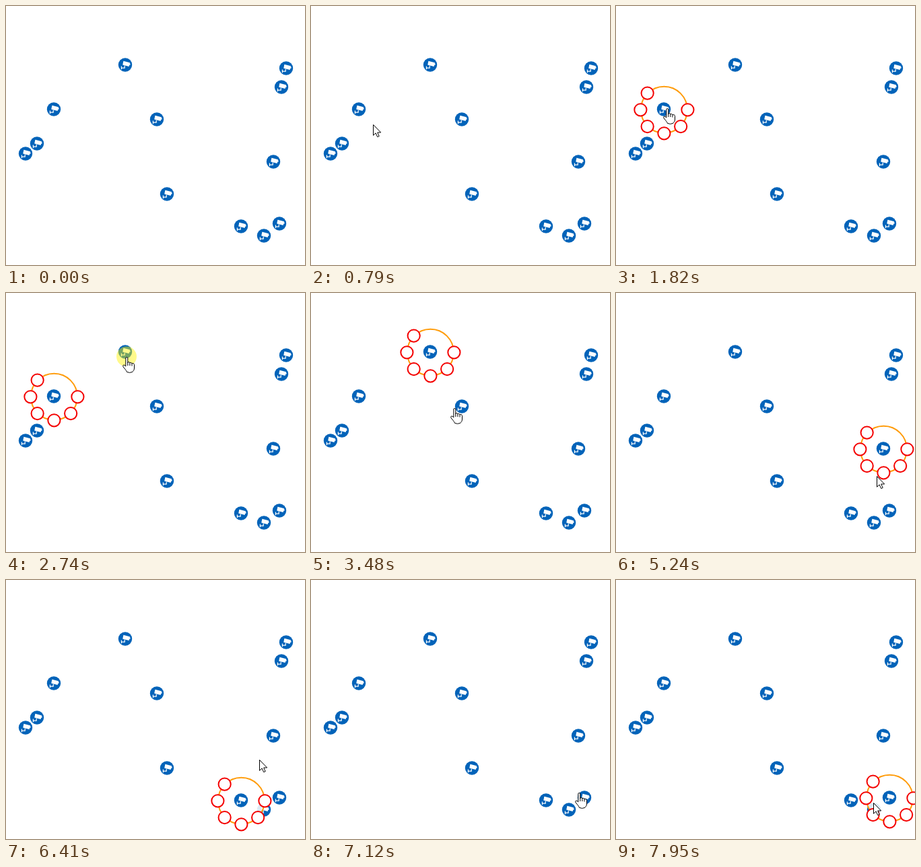
Animation, 444 px wide and 385 px high, one loop 7990 ms. Source, as an HTML page with a canvas:

```html
<!DOCTYPE html>
<html lang="en">
<head>
<meta charset="utf-8">
<title>Camera map</title>
<style>
  html, body { margin: 0; width: 100%; height: 100%; overflow: hidden; background: #fff; }
  canvas { display: block; width: 444px; height: 385px; }
</style>
</head>
<body>
<canvas id="stage"></canvas>
<script>
const W = 444, H = 385, LOOP = 7990;
const MENU_RADIUS = 35, CLICK_TIME = 100, SWAP_TIME = 160;
const canvas = document.getElementById('stage');
const ctx = canvas.getContext('2d');
const dpr = window.devicePixelRatio || 1;
canvas.width = W * dpr;
canvas.height = H * dpr;

// The first cameras are clicked in this order, one per click time
const cameras = [
  [71, 153.5], [177, 87.5], [224, 168.5], [397, 231.5], [349, 327.5], [406, 323.5],
  [416, 92.5], [409, 120.5], [46, 204.5], [29, 219.5], [239, 279.5], [383, 341.5]
];
const clicks = [1310, 2740, 3700, 4600, 5670, 6960];

// A click closes the open menu on release, then the next one opens
const menus = clicks.map((click, i) => ({
  center: cameras[i],
  opens: click + CLICK_TIME + (i ? SWAP_TIME : 0),
  closes: i + 1 < clicks.length ? clicks[i + 1] + CLICK_TIME : LOOP
}));

// Pointer stops: arrival time, x, y, travel time
const ENTER = 120;
const stops = [
  [ENTER, 291, 384], [910, 79, 162, 790], [1110, 74, 153, 180], [2232, 179, 94.5],
  [3300, 211, 170], [3640, 222, 177, 220], [4591, 406, 238], [5495, 358, 323],
  [6581, 384, 240], [6880, 398, 316, 299], [7950, 382, 331]
];

// Six nodes in 45 degree steps; the upper right place stays empty
const nodes = Array.from({ length: 6 }, (_, i) =>
  [MENU_RADIUS * Math.cos(i * Math.PI / 4), MENU_RADIUS * Math.sin(i * Math.PI / 4)]);

const cameraBody = new Path2D('M-2.6-5.8L7-3.2L5.6 2.4L-3.8 0ZM6.8-2L7.8-1.7L7.2 .5L6.2 .2Z');
const cameraMount = new Path2D('M-5.6 2V6.8M-5.6 4.6H-.8V1');
const arrow = new Path2D('M.5 .5V16.3L4.1 12.9L6.7 18.6L9.2 17.5L6.7 12H11.7Z');
const hand = new Path2D(
  'M-1.2 14V2Q-1.2 .5 .3 .5T1.8 2V8.6Q1.9 7.4 3.3 7.5T4.9 9Q5.2 8.1 6.5 8.4T8 10' +
  'Q8.3 9.2 9.8 9.6T11.5 11.5V17Q11.4 20 9.3 21.5L8.8 22.4Q4.5 24.4 .4 22.4' +
  'Q0 20.7-2 18.4L-4.8 15Q-6.1 12.9-4.6 12.1Q-3.1 11.4-1.2 14Z');
const knuckles = new Path2D('M1.8 8V13M4.9 9V13M8 10V13.5');

const smooth = u => u * u * (3 - 2 * u);
const near = (x, y, [cx, cy], r) => Math.hypot(x - cx, y - cy) < r;

function pointerAt(t) {
  let [[, x, y], ...rest] = stops;
  for (const [arrival, toX, toY, travel = 450] of rest) {
    const start = arrival - travel;
    if (t < start) break;
    const k = smooth(Math.min(1, (t - start) / travel));
    x += (toX - x) * k;
    y += (toY - y) * k;
  }
  return [x, y];
}

function disc(x, y, r, fill, stroke) {
  ctx.beginPath();
  ctx.arc(x, y, r, 0, Math.PI * 2);
  ctx.fillStyle = fill;
  ctx.fill();
  if (stroke) {
    ctx.strokeStyle = stroke;
    ctx.lineWidth = 2;
    ctx.stroke();
  }
}

function at(x, y, draw) {
  ctx.save();
  ctx.translate(x, y);
  draw();
  ctx.restore();
}

function drawCamera([x, y]) {
  at(x, y, () => {
    disc(0, 0, 10.2, '#0063b9');
    ctx.fillStyle = ctx.strokeStyle = '#fff';
    ctx.lineWidth = 1.2;
    ctx.fill(cameraBody);
    ctx.stroke(cameraMount);
  });
}

function drawMenu(center) {
  at(center[0] + .4, center[1] + .8, () => {
    disc(0, 0, MENU_RADIUS - .5, 'rgba(255,255,255,.86)', '#ff9c0a');
    for (const [x, y] of nodes) disc(x, y, 9.1, '#fff', '#f40000');
  });
  drawCamera(center);
}

function drawPointer(x, y, isHand) {
  at(x, y, () => {
    const shape = isHand ? hand : arrow;
    ctx.fillStyle = '#fff';
    ctx.strokeStyle = '#000';
    ctx.lineWidth = 1;
    ctx.lineJoin = 'round';
    ctx.fill(shape);
    ctx.stroke(shape);
    if (isHand) ctx.stroke(knuckles);
  });
}

function render(t) {
  ctx.setTransform(dpr, 0, 0, dpr, 0, 0);
  ctx.fillStyle = '#fff';
  ctx.fillRect(0, 0, W, H);
  cameras.forEach(drawCamera);

  const center = menus.find(m => t >= m.opens && t < m.closes)?.center;
  if (center) drawMenu(center);
  if (t < ENTER) return;

  const [x, y] = pointerAt(t);
  if (clicks.some(click => t >= click && t < click + CLICK_TIME)) {
    disc(x, y, 15, 'rgba(255,242,0,.46)');
  }
  // Cameras covered by an open menu do not react to the pointer
  const overCamera = cameras.some(c => near(x, y, c, 12) &&
    (!center || c === center || !near(...c, center, MENU_RADIUS)));
  const overNode = center && nodes.some(n => near(x - center[0], y - center[1], n, 10));
  drawPointer(Math.round(x), Math.round(y), overCamera || overNode);
}

const began = performance.now();
function tick() {
  render((performance.now() - began) % LOOP);
  requestAnimationFrame(tick);
}
tick();
</script>
</body>
</html>
```
